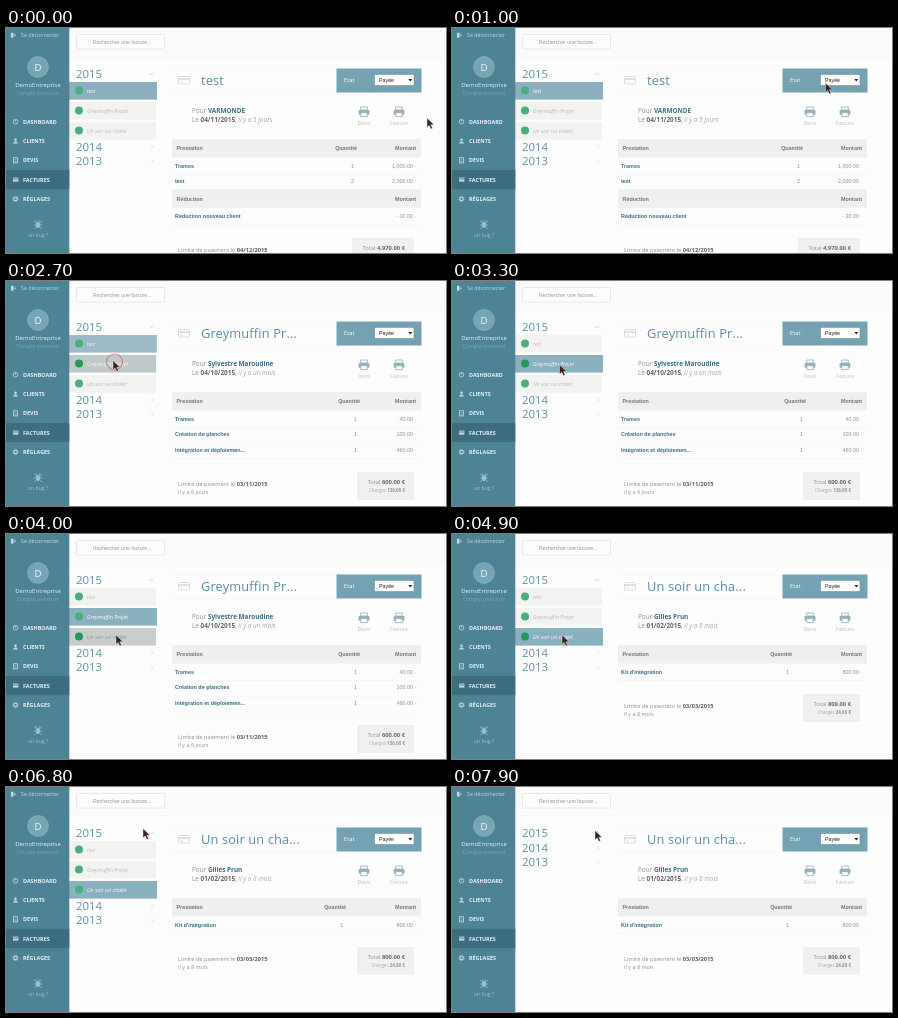
These frames come from a looping animation (440 by 225 pixels, 8000 ms). An HTML page:

```html
<!DOCTYPE html>
<html lang="fr">
<head>
<meta charset="utf-8">
<title>Factures</title>
<style>
html, body { margin: 0; width: 100%; height: 100%; overflow: hidden; background: #fdfdfd; }
svg { display: block; width: 100vw; height: 100vh; font-family: "Open Sans", sans-serif; }
.arial { font-family: "Liberation Sans", Arial, sans-serif; }
.b { font-weight: 700; }
.i { font-style: italic; }
</style>
</head>
<body>
<svg id="stage" viewBox="0 0 440 225"></svg>
<script>
const LOOP = 8000, STEP = 100;
const BLUE = '#3a6f84', SOFT = '#8ab1bf', GREY = '#8f8f8f';

const rect = (x, y, w, h, fill, extra = '') =>
  `<rect x="${x}" y="${y}" width="${w}" height="${h}" fill="${fill}" ${extra}/>`;
const text = (x, y, size, fill, str, cls = '', anchor = 'start', extra = '') =>
  `<text x="${x}" y="${y}" font-size="${size}" fill="${fill}" class="${cls}" text-anchor="${anchor}" ${extra}>${str}</text>`;
const line = (d, color, w = 0.8, extra = '') =>
  `<path d="${d}" fill="none" stroke="${color}" stroke-width="${w}" ${extra}/>`;
const span = (str, fill, cls = 'b') => `<tspan fill="${fill}" class="${cls}">${str}</tspan>`;

const invoices = [
  { title: 'test', client: 'VARMONDE', date: '04/11/2015', ago: 'il y a 5 jours', qx: 351,
    rows: [['Trames', '1', '1,000.00'], ['test', '2', '2,000.00']],
    discount: ['Réduction nouveau client', '- 30.00'],
    due: '04/12/2015', late: '', foot: 210, boxX: 346, total: '4,970.00', fees: '' },
  { title: 'Greymuffin Pr...', client: 'Sylvestre Maroudine', date: '04/10/2015', ago: 'il y a un mois', qx: 354,
    rows: [['Trames', '1', '40.00'], ['Création de planches', '1', '100.00'], ['Intégration et déploiemen...', '1', '460.00']],
    due: '03/11/2015', late: 'il y a 6 jours', foot: 191, boxX: 351, total: '600.00', fees: '136.00' },
  { title: 'Un soir un cha...', client: 'Gilles Prun', date: '01/02/2015', ago: 'il y a 8 mois', qx: 340,
    rows: [["Kit d'intégration", '1', '800.00']],
    due: '03/03/2015', late: 'il y a 8 mois', foot: 160, boxX: 351, total: '800.00', fees: '24.80' }
];
const labels = ['test', 'Greymuffin Projet', 'Un soir un chalet'];

function menuIcon(k, y) {
  const c = '#c3d8df';
  return [
    `<circle cx="9.5" cy="${y}" r="2.3" fill="none" stroke="${c}" stroke-width=".8"/>` + line(`M9.5 ${y}v-1.8`, c),
    `<circle cx="9.5" cy="${y - 1.2}" r="1.3" fill="${c}"/><path d="M6.9 ${y + 2.5}q2.6-4.4 5.2 0z" fill="${c}"/>`,
    rect(7.5, y - 2.6, 4, 5.2, 'none', `stroke="${c}" stroke-width=".8"`) + line(`M8.5 ${y - .6}h2M8.5 ${y + 1}h2`, c, .6),
    rect(7, y - 2, 5.4, 4, c) + line(`M7 ${y - .6}h5.4`, '#3d6d7f', .8),
    `<circle cx="9.5" cy="${y}" r="1.7" fill="none" stroke="${c}" stroke-width="1.1"/>` +
      `<circle cx="9.5" cy="${y}" r="2.6" fill="none" stroke="${c}" stroke-width=".8" stroke-dasharray="1 1.04"/>`
  ][k];
}

function sidebar() {
  const items = ['DASHBOARD', 'CLIENTS', 'DEVIS', 'FACTURES', 'RÉGLAGES'];
  const menu = items.map((name, k) => {
    const y = 93.7 + 19.3 * k;
    return menuIcon(k, y) + text(17, y + 2, 5.4, '#eaf2f5', name, 'b');
  }).join('');
  const bug = '#a0c0cb';
  return rect(0, 0, 63.3, 225, '#4e8396') + rect(0, 142, 63.3, 19, '#3d6d7f') +
    rect(5, 4.8, 2.4, 4.8, '#c9dde4') + line('M7.4 7.2h2.4M8.6 6l1.2 1.2l-1.2 1.2', '#c9dde4', .6) +
    text(15, 9.2, 5.3, '#c3d8df', 'Se déconnecter') +
    '<circle cx="32" cy="39" r="10.5" fill="#78a5b5" stroke="#8fb4c1" stroke-width=".6"/>' +
    text(32, 42.5, 9.6, '#f3f8fa', 'D', '', 'middle') +
    text(32, 59.2, 6, '#eaf2f5', 'DemoEntreprise', '', 'middle') +
    text(32, 67.3, 5.2, '#7ba7b6', 'Compte premium', '', 'middle') + menu +
    `<ellipse cx="32" cy="197" rx="2.2" ry="3" fill="${bug}"/>` +
    line('M28 193l2.5 2M36 193l-2.5 2M27.7 197h8.6M28 201l2.5-2M36 201l-2.5-2M31 194l-1-2M33 194l1-2', bug, .7) +
    text(32, 209, 5.2, bug, 'un bug ?', '', 'middle');
}

function printer(x, label) {
  const c = '#93b0bb';
  return rect(x - 3.3, 79, 6.6, 3, 'none', `stroke="${c}" stroke-width=".8"`) +
    rect(x - 5.4, 82, 10.8, 4.8, c, 'rx=".8"') +
    rect(x - 3.2, 84.7, 6.4, 4, '#fdfdfd', `stroke="${c}" stroke-width=".8"`) +
    text(x, 97.2, 5.2, '#bdbdbd', label, '', 'middle');
}

function header() {
  return rect(63, 0, 377, 28, '#fafbfb') + line('M63 28.3H440', '#f2f2f2', .6) +
    rect(70.5, 6.5, 88, 14.5, '#fdfdfd', 'stroke="#e4e4e4" stroke-width=".8" rx="1"') +
    text(87, 15.5, 5.2, '#979797', 'Rechercher une facture...', 'arial') +
    line('M166 41.2H331M166 65H331', '#f4f4f4', .6) +
    rect(172.5, 48.5, 11, 7.5, 'none', 'stroke="#d2d6d8" stroke-width=".8" rx=".8"') +
    line('M172.5 51h11', '#d2d6d8', 1.4) + line('M174 54h3', '#d2d6d8', .7) +
    rect(330.5, 40.5, 85, 24, '#74a2b2') + text(338, 54, 5.8, '#fff', 'Etat') +
    rect(368.5, 46.3, 39.5, 11.3, '#fff', 'stroke="#5f8d9c" stroke-width=".6"') +
    text(373, 54, 5.3, '#222', 'Payée', 'arial') +
    '<path d="M402.3 51h4l-2 2.5z" fill="#222"/>' +
    printer(358, 'Devis') + printer(393, 'Facture');
}

function tableHead(y, left, right, mid = '', qx = 0) {
  const cell = (x, s, a) => text(x, y + 11.2, 5.4, '#757575', s, 'arial b', a);
  return rect(166, y, 249, 18.5, '#efefef') + cell(170.5, left) + cell(410, right, 'end') + (mid && cell(qx, mid, 'end'));
}

function tableRow(y, name, qty, amount, qx) {
  return text(169, y, 5.4, BLUE, name, 'arial b') +
    (qty && text(qx - 3, y, 5.4, GREY, qty, 'arial', 'end') + text(qx - 1.5, y, 4, '#ccc', '-')) +
    text(407, y, 5.4, GREY, amount, 'arial', 'end') + text(408.5, y, 4.5, '#ccc', '›') +
    line(`M166 ${y + 6.8}H415`, '#f2f2f2', .6);
}

function invoice(v, k) {
  const f = v.foot;
  let s = text(195, 57, 12.8, '#5b8da2', v.title, '', 'start', 'letter-spacing=".15"') +
    text(186, 84.5, 6.4, GREY, 'Pour ' + span(v.client, BLUE)) +
    text(186, 94.3, 6.4, GREY, 'Le ' + span(v.date, '#646464') + ', ' + span(v.ago, '#a8a8a8', 'i')) +
    tableHead(111, 'Prestation', 'Montant', 'Quantité', v.qx) +
    v.rows.map((r, n) => tableRow(139.6 + 15.8 * n, ...r, v.qx)).join('');
  if (v.discount) s += tableHead(161.3, 'Réduction', 'Montant') + tableRow(190, v.discount[0], '', v.discount[1], 0);
  s += text(172, f + 14, 5.7, GREY, 'Limite de paiement le ' + span(v.due, '#5c5c5c')) +
    text(172, f + 22.4, 5.5, GREY, v.late) +
    rect(v.boxX, f, 408 - v.boxX, 28, '#f0f0f0', 'rx="1"') +
    text(399, f + 12, 5.8, GREY, 'Total ' + span(v.total + ' €', '#666'), '', 'end');
  if (v.fees) s += text(399, f + 20.3, 4.5, '#a8a8a8', 'Charges ' + span(v.fees + ' €', '#959595'), '', 'end');
  return `<g id="inv${k}">${s}</g>`;
}

const year = (n, y) => text(70, y, 11.4, '#5f91a6', n);
const side = y => line(`M145.2 ${y - 2}l2 2l-2 2`, '#d0d8dc', .7);

function list() {
  const rows = labels.map((s, k) => {
    const y = 54 + 20 * k;
    return `<rect id="row${k}" x="63" y="${y}" height="17.6"/>` +
      `<circle id="dot${k}" cx="73" cy="${y + 8.5}" r="4"/>` +
      `<text id="lab${k}" x="81" y="${y + 10.8}" font-size="5.3" class="i">${s}</text>`;
  }).join('');
  return year(2015, 49.9) + `<path id="chev" fill="none" stroke="#c0cacf" stroke-width=".7"/>` +
    `<clipPath id="fold"><rect id="foldBox" x="63" y="53" width="92" height="60"/></clipPath>` +
    `<g clip-path="url(#fold)">${rows}</g>` +
    `<g id="older">${year(2014, 122.8) + side(118.8) + year(2013, 137.3) + side(133.3)}</g>`;
}

const stage = document.getElementById('stage');
stage.innerHTML = rect(0, 0, 440, 225, '#fdfdfd') + header() + invoices.map(invoice).join('') + list() + sidebar() +
  '<circle id="ring" fill="none" stroke="#d4504a" stroke-width="1"/>' +
  '<path id="arrow" d="M0 0V9.4L2.2 7.4L3.8 11L5.5 10.2L3.9 6.8H7Z" fill="#38231a" stroke="#fff" stroke-width=".4"/>';

const $ = id => document.getElementById(id);
const set = (id, attrs) => { for (const a in attrs) $(id).setAttribute(a, attrs[a]); };
const clamp = x => Math.min(1, Math.max(0, x));
const ease = x => x * x * (3 - 2 * x);
const ramp = (t, a, b) => ease(clamp((t - a) / (b - a)));
const rgb = h => [1, 3, 5].map(i => parseInt(h.slice(i, i + 2), 16));
function mix(a, b, p) {
  const A = rgb(a), B = rgb(b);
  return '#' + A.map((v, i) => Math.round(v + (B[i] - v) * p).toString(16).padStart(2, '0')).join('');
}

// pointer moves: start, end, x, y
const moves = [[300, 900, 373.5, 55], [1400, 2200, 107, 79.5], [3100, 3800, 110, 101], [5700, 6600, 137, 41.5], [6800, 7100, 143, 43.5]];
const clicks = [2500, 4400, 7200];

function pointer(t) {
  let x = 421, y = 90;
  for (const [a, b, tx, ty] of moves) {
    const p = ramp(t, a, b);
    x += (tx - x) * p;
    y += (ty - y) * p;
  }
  return [x, y];
}

function draw(t) {
  const [x, y] = pointer(t);
  const [c1, c2, c3] = clicks;
  const shown = t < c1 + 100 ? 0 : t < c2 + 100 ? 1 : 2;
  invoices.forEach((_, k) => set('inv' + k, { display: k === shown ? 'inline' : 'none' }));

  const to1 = ramp(t, c1 + 100, c1 + 500), to2 = ramp(t, c2 + 100, c2 + 500);
  const active = [1 - to1, to1 * (1 - to2), to2];
  const fold = ramp(t, c3 + 50, c3 + 400);
  active.forEach((p, k) => {
    const top = 54 + 20 * k;
    const over = x > 63 && x < 151 && y > top && y < top + 17.6 && fold === 0;
    set('row' + k, { fill: mix(over ? '#c9cdcb' : '#f2f2f1', SOFT, p), width: 87 + p });
    set('dot' + k, { fill: over ? '#1f9a5b' : '#48b07e' });
    set('lab' + k, { fill: mix(over ? (k === 1 ? '#f4f4f4' : '#8f9494') : '#b8b8b8', '#ffffff', p) });
  });
  set('foldBox', { height: 60 * (1 - fold) });
  set('older', { transform: `translate(0 ${-57.8 * fold})` });
  set('chev', { d: fold < 0.5 ? 'M143.2 45l2 2l2-2' : 'M145.2 44l2 2l-2 2' });

  const hit = clicks.find(c => t >= c && t < c + 400);
  const age = hit === undefined ? 1 : (t - hit) / 400;
  set('ring', { cx: x + 1.5, cy: y + 1.5, r: 4 + 8 * age, opacity: age < 1 ? 1 - age * age : 0 });
  set('arrow', { transform: `translate(${x} ${y})` });
}

function tick() {
  const t = performance.now() % LOOP;
  draw(Math.floor(t / STEP) * STEP);
  requestAnimationFrame(tick);
}
tick();
</script>
</body>
</html>
```
